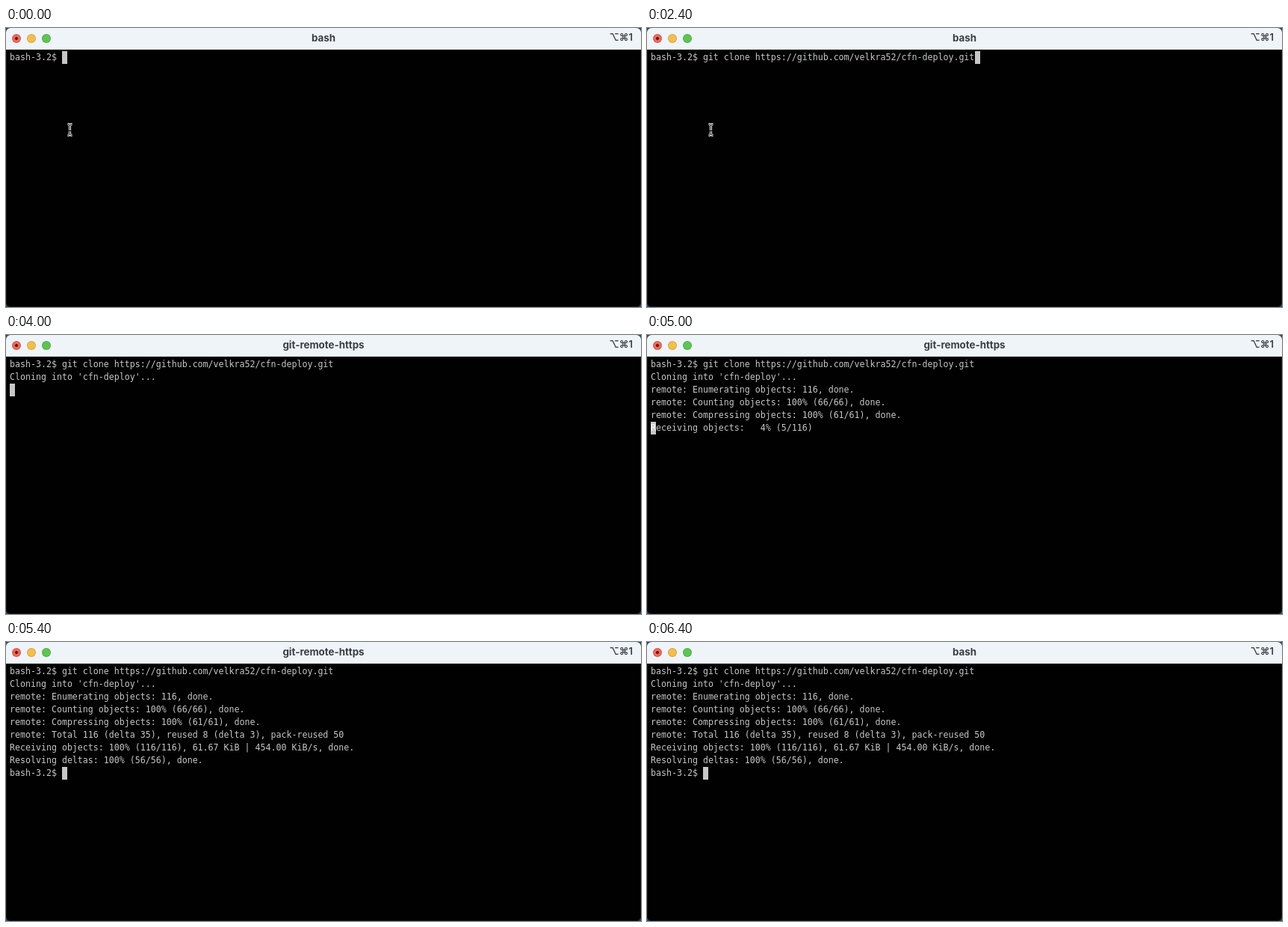
Write an HTML page that moves like this. It is 850 px wide and 373 px high and loops after 8000 ms.

```html
<!DOCTYPE html>
<html lang="en">
<meta charset="utf-8">
<title>Terminal</title>
<style>
html, body { margin: 0; width: 100%; height: 100%; overflow: hidden; background: #1f4d6c; }
#window { position: absolute; left: 0; top: 0; width: 850px; height: 373px; border-radius: 6px; overflow: hidden; background: #010102; }
#window::after { content: ""; position: absolute; inset: 29px 0 0; border: 1px solid #111416; border-top: 0; border-radius: 0 0 6px 6px; }
#bar { position: absolute; width: 850px; height: 28px; background: #eff4f9; border-bottom: 1px solid #d3d8dc; color: #3b3e42; font: 700 13.35px/27px Inter, "DejaVu Sans", sans-serif; text-align: center; }
#bar i { position: absolute; top: 8px; width: 12px; height: 12px; border-radius: 50%; box-shadow: inset 0 0 0 1px #0002; }
#keys { position: absolute; right: 11px; top: -1px; font-size: 13px; font-weight: 600; }
#text, #cursor { position: absolute; margin: 0; font: 11.627px/17px "DejaVu Sans Mono", monospace; font-variant-ligatures: none; white-space: pre; }
#text { left: 5px; top: 31px; color: #c7c7c7; }
#cursor { width: 7px; height: 17px; background: #c7c7c7; color: #fff; }
#beam { position: absolute; left: 80px; top: 126px; fill: none; }
</style>
<div id="window">
  <div id="bar">
    <i style="left:8px;background:radial-gradient(circle, #6b1510 1.7px, #ec6a5e 2.3px)"></i>
    <i style="left:28px;background:#f4be4f"></i>
    <i style="left:48px;background:#5fc454"></i>
    <span id="title"></span><span id="keys">⌥⌘1</span>
  </div>
  <pre id="text"></pre>
  <div id="cursor"></div>
  <svg id="beam" width="12" height="20">
    <defs><path id="shape" d="M2.5 2.5Q5.5 2.5 5.5 5V15Q5.5 17.5 2.5 17.5M8.5 2.5Q5.5 2.5 5.5 5M5.5 15Q5.5 17.5 8.5 17.5M4 11.5H7"/></defs>
    <use href="#shape" stroke="#fff" stroke-width="3"/><use href="#shape" stroke="#000"/>
  </svg>
</div>
<script>
const $ = id => document.getElementById(id);
const prompt = 'bash-3.2$ ';
const command = prompt + 'git clone https://github.com/velkra52/cfn-deploy.git';
const cloning = [command, "Cloning into 'cfn-deploy'..."];
const remote = [
  ...cloning,
  'remote: Enumerating objects: 116, done.',
  'remote: Counting objects: 100% (66/66), done.',
  'remote: Compressing objects: 100% (61/61), done.'
];
const total = [...remote, 'remote: Total 116 (delta 35), reused 8 (delta 3), pack-reused 50'];

// Screen contents by start time; the cursor sits on the last line.
const screens = [
  { at: 0, lines: [prompt] },
  { at: 2400, lines: [command] },
  { at: 3400, lines: [...cloning, ''] },
  { at: 5000, lines: [...remote, 'Receiving objects:   4% (5/116)'], column: 0 },
  { at: 5200, lines: [...total, 'Receiving objects: 100% (116/116)'], column: 0 },
  { at: 5400, lines: [
    ...total,
    'Receiving objects: 100% (116/116), 61.67 KiB | 454.00 KiB/s, done.',
    'Resolving deltas: 100% (56/56), done.',
    prompt
  ] }
];

let shown;
function draw() {
  const t = performance.now() % 8000;
  $('title').textContent = t >= 4000 && t < 6000 ? 'git-remote-https' : 'bash';
  $('beam').style.display = t < 3200 ? '' : 'none';
  const screen = screens.findLast(s => t >= s.at);
  if (screen !== shown) {
    shown = screen;
    const { lines } = screen;
    const last = lines.at(-1);
    const column = screen.column ?? last.length;
    $('text').textContent = lines.join('\n');
    $('cursor').textContent = last[column] ?? '';
    $('cursor').style.left = 5 + 7 * column + 'px';
    $('cursor').style.top = 31 + 17 * (lines.length - 1) + 'px';
  }
  requestAnimationFrame(draw);
}
draw();
</script>
</html>
```
